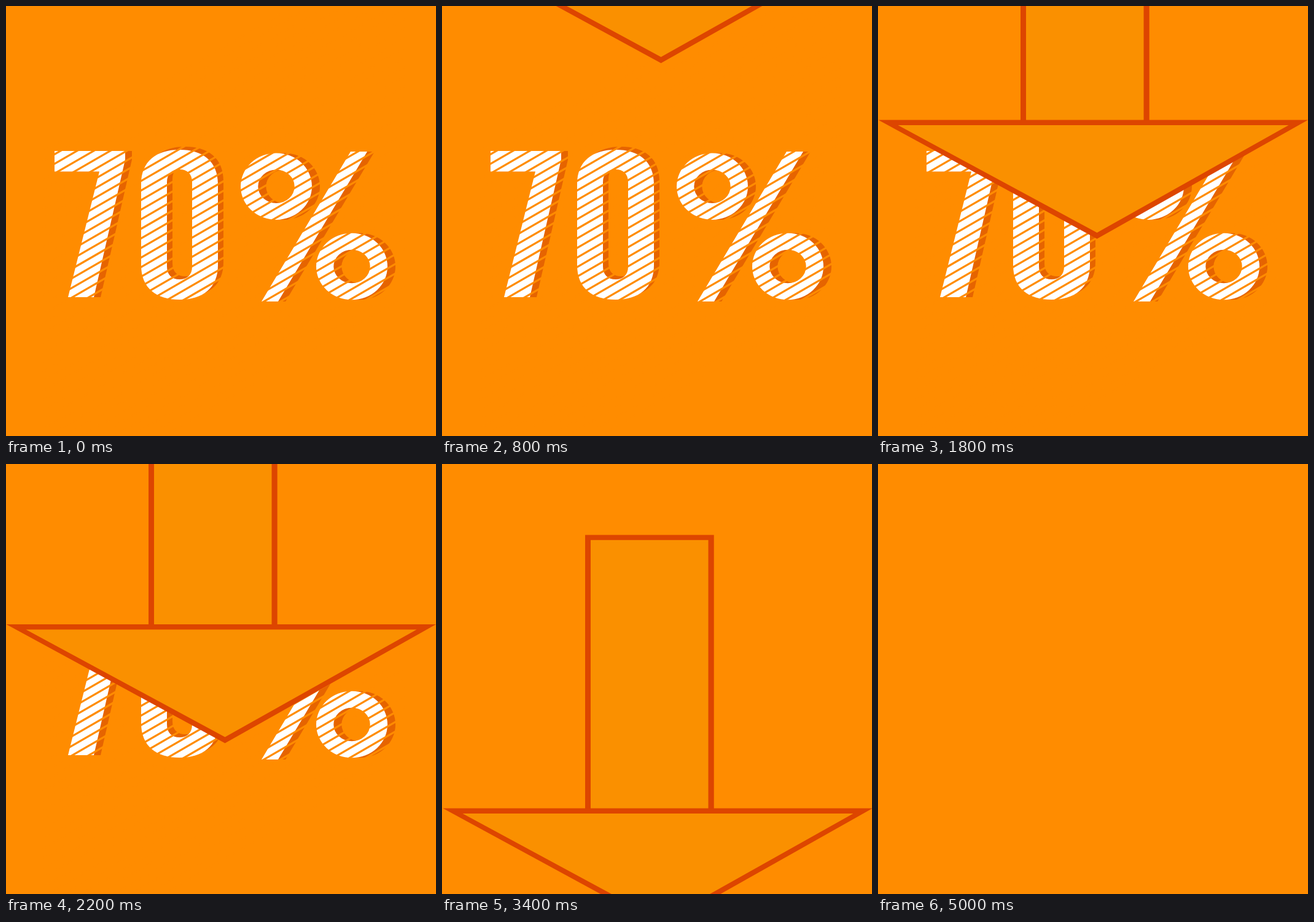
Animation of 700 by 700 pixels, one loop 5.4 s. Source, as an HTML page with a canvas:

```html
<!DOCTYPE html>
<html lang="en">
<head>
<meta charset="utf-8">
<title>70%</title>
<style>
html, body { margin: 0; width: 100%; height: 100%; overflow: hidden; background: #ff8c00; }
canvas { display: block; width: 700px; height: 700px; }
</style>
</head>
<body>
<canvas id="stage" width="700" height="700" role="img" aria-label="70%"></canvas>
<script>
const ctx = document.getElementById('stage').getContext('2d');
const SIZE = 700, LOOP = 5400, STEP = 200;
const BG = '#ff8c00', SHADE = '#e66400', EDGE = '#dd4500', FILL = '#fa9000';

function polygon(points) {
  const path = new Path2D();
  points.forEach(([x, y]) => path.lineTo(x, y));
  path.closePath();
  return path;
}

// Tall oval: straight sides, curved ends of height h
function addOval(path, left, top, right, bottom, h) {
  const mid = (left + right) / 2, bend = (right - left) * 0.2, pull = h * 0.33;
  path.moveTo(left, top + h);
  path.bezierCurveTo(left, top + pull, left + bend, top, mid, top);
  path.bezierCurveTo(right - bend, top, right, top + pull, right, top + h);
  path.lineTo(right, bottom - h);
  path.bezierCurveTo(right, bottom - pull, right - bend, bottom, mid, bottom);
  path.bezierCurveTo(left + bend, bottom, left, bottom - pull, left, bottom - h);
  path.closePath();
}

function zero() {
  const path = new Path2D();
  addOval(path, 220, 234, 345, 478, 56);
  addOval(path, 262, 266, 303, 445, 21);
  return path;
}

function ring(x, y) {
  const path = new Path2D();
  for (const [rx, ry] of [[58, 54.3], [29.7, 27.3]]) {
    path.moveTo(x + rx, y);
    path.ellipse(x, y, rx, ry, 0, 0, Math.PI * 2);
  }
  return path;
}

const seven = polygon([[79, 236], [194, 236], [194, 250], [143, 474], [101, 474], [152, 269.5], [79, 269.5]]);
const slash = polygon([[561, 237], [588, 237], [443, 481], [416, 481]]);

const glyphs = [
  { path: seven, dx: 11, dy: 0 },
  { path: zero(), dx: 9, dy: -5 },
  { path: ring(440, 293.7), dx: 13, dy: 0 },
  { path: slash, dx: 12, dy: 0 },
  { path: ring(563, 424), dx: 13, dy: 0 }
];

// Parallel cuts rising at 30 degrees, 13.5 apart
function drawStripes() {
  const slope = Math.tan(Math.PI / 6), period = 13.5 / Math.cos(Math.PI / 6);
  ctx.strokeStyle = BG;
  ctx.lineWidth = 3.2;
  ctx.beginPath();
  for (let c = 271.4; c < 860; c += period) {
    ctx.moveTo(60, c - 60 * slope);
    ctx.lineTo(650, c - 650 * slope);
  }
  ctx.stroke();
}

function drawNumber(top) {
  ctx.save();
  ctx.beginPath();
  ctx.rect(0, Math.max(top, 0), SIZE, SIZE);
  ctx.clip();
  for (const { path, dx, dy } of glyphs) {
    ctx.save();
    ctx.translate(dx, dy);
    ctx.fillStyle = SHADE;
    ctx.fill(path, 'evenodd');
    ctx.restore();
    ctx.fillStyle = '#fff';
    ctx.fill(path, 'evenodd');
  }
  drawStripes();
  ctx.restore();
}

// Upper edge of the arrow head: slows down, then speeds up again
function arrowTop(t) {
  if (t <= 2400) {
    const k = (t - 1200) / STEP;
    return 30.5 + 60 * k - 2.78 * k * k;
  }
  const s = (t - 2600) / STEP;
  return 328.5 + 50.2 * s + 1.95 * s * s;
}

const headOuter = polygon([[0.5, 0], [700, 0], [356.5, 193.5]]);
const headInner = polygon([[32.5, 8.5], [668.5, 8.5], [356.5, 183.5]]);

function drawArrow(t, top) {
  ctx.save();
  ctx.translate(t >= 2400 ? 1 : 0, top);
  ctx.fillStyle = EDGE;
  ctx.fillRect(232, -445, 209.7, 446);
  ctx.fill(headOuter);
  ctx.fillStyle = FILL;
  ctx.fillRect(241, -436.7, 191.5, 436.7);
  ctx.fill(headInner);
  ctx.restore();
}

function render(now) {
  const t = Math.floor((now % LOOP) / STEP) * STEP;
  const top = arrowTop(t);
  ctx.fillStyle = BG;
  ctx.fillRect(0, 0, SIZE, SIZE);
  if (top < 490) drawNumber(top);
  if (t < 5000) drawArrow(t, top);
}

let start;
function tick(now) {
  start ??= now;
  render(now - start);
  requestAnimationFrame(tick);
}
render(0);
requestAnimationFrame(tick);
</script>
</body>
</html>
```
